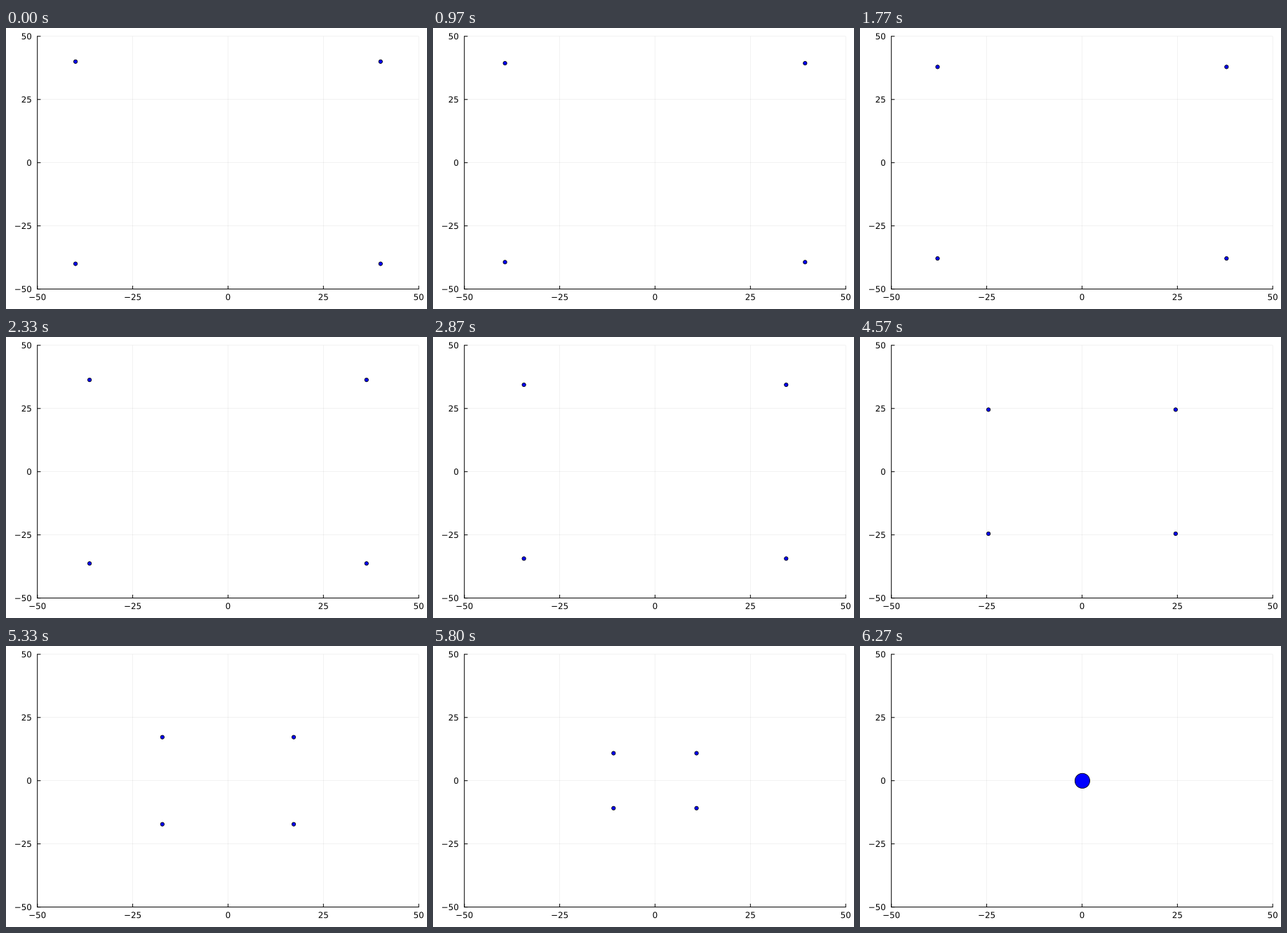
Recreate the animation shown at these times as a matplotlib script. Size 600x400 px, loop 8 s.

```python
import matplotlib.pyplot as plt
import numpy as np
from matplotlib.animation import FuncAnimation
from matplotlib.patches import Circle, PathPatch
from matplotlib.textpath import TextPath
from matplotlib.transforms import Affine2D

plt.rcParams["font.family"] = "DejaVu Sans"

W, H, DPI = 600, 400, 100
PX = 72 / DPI                       # one pixel in points
LEFT, RIGHT, TOP, BOTTOM = 44.7, 588.19, 11.81, 371.61
TICKS = (-50, -25, 0, 25, 50)
TICK_LEN = 4.72
FONT_PX, CAP_PX = 11.85, 8.64
DIGIT_EM, MINUS_EM = 0.636, 0.838   # glyph advances

LOOP_MS, TICK_MS = 8000, 10
START = 40                          # starting offset of every body
RATE, LEAD = 0.00836, 1.5           # fall phase per step, initial lead in steps
MERGE_STEP = 188
SMALL_R, BIG_R = 2.65, 10.6

# Free fall under inverse-square attraction: phase = a + sin(a) cos(a), u = cos(a)^2
ANGLE = np.linspace(0, np.pi / 2, 2000)
PHASE = ANGLE + np.sin(ANGLE) * np.cos(ANGLE)


def to_x(v):
    return LEFT + (v + 50) / 100 * (RIGHT - LEFT)


def to_y(v):
    return BOTTOM - (v + 50) / 100 * (BOTTOM - TOP)


def offset(step):
    angle = np.interp(RATE * (step + LEAD), PHASE, ANGLE)
    return START * np.cos(angle) ** 2


fig = plt.figure(figsize=(W / DPI, H / DPI), dpi=DPI, facecolor="white")
ax = fig.add_axes([0, 0, 1, 1])
ax.set_xlim(0, W)
ax.set_ylim(H, 0)
ax.axis("off")


def line(x0, y0, x1, y1, width=1, alpha=1):
    ax.plot([x0, x1], [y0, y1], color="black", lw=width * PX, alpha=alpha,
            solid_capstyle="butt", snap=False)


def label(x, y, value, align):
    """Draw a number at subpixel position; align 0.5 centres, 1 right-aligns."""
    text = str(value).replace("-", "\u2212")
    minus = text.count("\u2212")
    width = FONT_PX * (MINUS_EM * minus + DIGIT_EM * (len(text) - minus))
    place = Affine2D().scale(1, -1).translate(x - align * width, y)
    ax.add_patch(PathPatch(TextPath((0, 0), text, size=FONT_PX), fc="black", lw=0,
                           transform=place + ax.transData))


def dot(x, y, r):
    return ax.add_patch(Circle((x, y), r, fc="#0000ff", ec="black",
                               lw=0.8 * PX, zorder=3))


for v in TICKS:
    x, y = to_x(v), to_y(v)
    line(x, TOP, x, BOTTOM, 0.5, 0.1)
    line(LEFT, y, RIGHT, y, 0.5, 0.1)
    line(x, BOTTOM, x, BOTTOM - TICK_LEN)
    line(LEFT, y, LEFT + TICK_LEN, y)
    label(x, 387.21, v, 0.5)
    label(36.8, y + CAP_PX / 2, v, 1)

line(LEFT, TOP - 0.5, LEFT, BOTTOM + 0.5)
line(LEFT - 0.5, BOTTOM, RIGHT + 0.5, BOTTOM)

SIGNS = [(-1, -1), (-1, 1), (1, -1), (1, 1)]
bodies = [dot(0, 0, SMALL_R) for _ in SIGNS]
ball = dot(316.9, 191.9, BIG_R)


def update(i):
    step = int((i + 0.5) * TICK_MS * 30 / 1000)
    merged = step >= MERGE_STEP
    r = offset(step)
    for body, (sx, sy) in zip(bodies, SIGNS):
        body.center = to_x(sx * r), to_y(sy * r)
        body.set_visible(not merged)
    ball.set_visible(merged)
    return [*bodies, ball]


anim = FuncAnimation(fig, update, frames=LOOP_MS // TICK_MS, interval=TICK_MS,
                     repeat=True, repeat_delay=0, blit=True)
plt.show()
```
